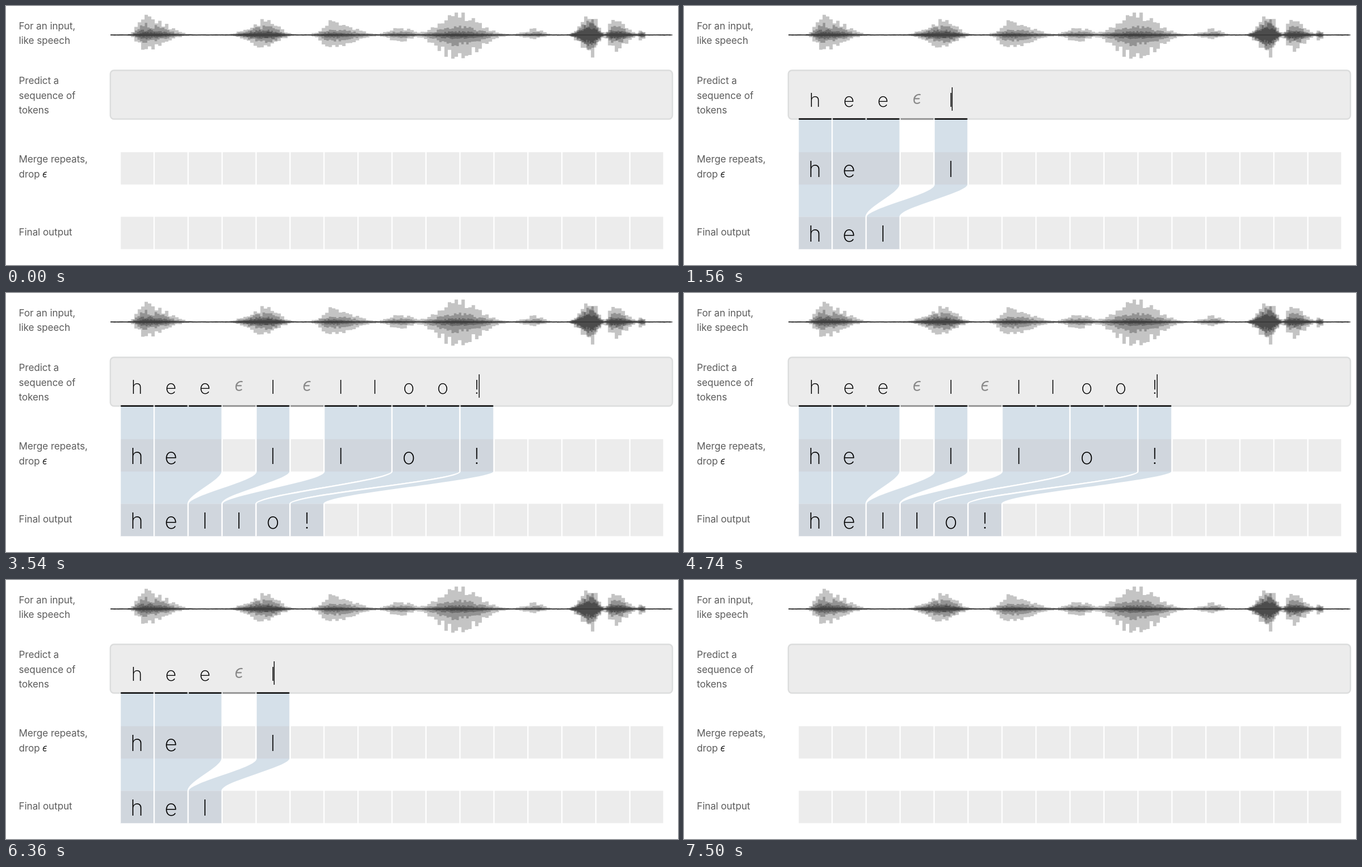
Animation of 1203 by 465 pixels, one loop 8 s. Source, as an HTML page:

```html
<!DOCTYPE html>
<html lang="en">
<head>
<meta charset="utf-8">
<style>
html, body { margin: 0; width: 100%; height: 100%; overflow: hidden; background: #fff; }
svg { display: block; }
text { font-family: Inter, "Open Sans", sans-serif; }
.label { font-size: 17.3px; fill: #5c5c5c; letter-spacing: -.05px; }
.token, .letter { font-weight: 200; text-anchor: middle; }
.token { font-size: 34.5px; }
.letter { font-size: 39.5px; }
.eps { fill: none; stroke-width: 2.3; stroke-linecap: round; }
.side { fill: none; stroke: #fff; }
</style>
</head>
<body>
<svg width="1203" height="465" viewBox="0 0 1203 465">
  <g id="wave"></g>
  <g id="labels"></g>
  <rect x="186.8" y="115.6" width="1006.2" height="87.4" rx="6.5" fill="#ececec" stroke="#dcdddd" stroke-width="2.5"/>
  <g id="cells"></g>
  <g id="typed"></g>
</svg>
<script>
const LOOP = 8000, STEP = 800 / 3, TYPE_AT = 480, ERASE_AT = 4809;
const TOKENS = "heeϵlϵlloo!";
const LEFT = 205.5, PITCH = 60.83, CELL = 58.5, GAP = PITCH - CELL;
const TOP = 204.1, MERGED_Y = 262.5, OUTPUT_Y = 378.5, CELL_H = 58;
const $ = id => document.getElementById(id);
const cellX = i => LEFT + PITCH * i;
const centre = i => cellX(i) + CELL / 2 - .3;
const rect = (x, y, w, h, fill) =>
  `<rect x="${x}" y="${y}" width="${w}" height="${h}" fill="${fill}"/>`;
const text = (x, y, cls, s) => `<text x="${x}" y="${y}" class="${cls}">${s}</text>`;

// Lunate epsilon: open bowl with a middle bar, centred on x, y
const epsilon = (x, y, scale, colour) =>
  `<path class="eps" transform="translate(${x} ${y}) scale(${scale})" stroke="${colour}" ` +
  `d="M5.4-7.9C-1-9-5.4-4-5.4 1.5C-5.4 6-3 7.9 0 7.9C2 7.9 3.3 7.3 4.4 6.4M-4.6-.6H3.6"/>`;

// Speech bursts: centre, rise and fall widths, height above and below, density
const BURSTS = [
  [249, 17, 45, 42, 30, .5], [465, 40, 30, 28, 24, .6], [584, 24, 50, 26, 27, .45],
  [706, 28, 30, 15, 13, .45], [810, 46, 50, 41, 48, .42], [950, 30, 18, 12, 8, .45],
  [1048, 23, 14, 45, 43, .72], [1088, 11, 28, 32, 30, .58], [1138, 6, 6, 12, 12, .6]
];

let seed = 11;
const random = () => (seed = seed * 16807 % 2147483647) / 2147483647;

// Each deeper layer is finer, lower and darker
function waveLayer(depth) {
  const pitch = 6.1 * .72 ** depth;
  let d = "";
  for (let x = 187; x < 1190; x += pitch) {
    let up = 1.2, down = 1.2;
    for (const [mid, rise, fall, high, low, density] of BURSTS) {
      const off = x + pitch / 2 - mid;
      const size = Math.exp(-((off / (off < 0 ? rise : fall)) ** 2)) * density ** depth;
      up = Math.max(up, high * size);
      down = Math.max(down, low * size);
    }
    const jitter = () => .6 + .45 * random();
    const y = 52 - up * jitter();
    d += `M${x} ${y}h${pitch}V${52 + down * jitter()}h${-pitch}z`;
  }
  return `<path d="${d}" fill-opacity="${.23 + .02 * depth}"/>`;
}

$("wave").innerHTML = [0, 1, 2, 3].map(waveLayer).join("") +
  rect(187, 51.4, 1003, 1.2, "rgba(0,0,0,.4)");

const LABELS = [
  [41.5, "For an input,", "like speech"],
  [140, "Predict a", "sequence of", "tokens"],
  [281, "Merge repeats,", "drop"],
  [412, "Final output"]
];
$("labels").innerHTML = LABELS.map(([y, ...lines]) =>
  lines.map((s, i) => text(23, y + 26.5 * i, "label", s)).join("")).join("") +
  epsilon(69.5, 302.8, .55, "#111");

$("cells").innerHTML = Array.from({ length: 16 }, (_, i) =>
  [MERGED_Y, OUTPUT_Y].map(y => rect(cellX(i), y, CELL, CELL_H, "#ececec")).join("")).join("");

function mergeRepeats(tokens) {
  const groups = [];
  [...tokens].forEach((c, i) => {
    if (c === "ϵ") return;
    if (tokens[i - 1] === c) groups[groups.length - 1].last = i;
    else groups.push({ c, first: i, last: i });
  });
  return groups;
}

// A band flows from its token cells to one output cell, with white edges
function drawGroup({ c, first, last }, slot) {
  const edge = i => cellX(i) - GAP / 2;
  const l = edge(first), r = edge(last + 1), L = edge(slot), R = edge(slot + 1);
  const y = MERGED_Y + CELL_H, bend = (OUTPUT_Y - y) * .28;
  const end = OUTPUT_Y + CELL_H, blue = "#d5e0e9", dark = "#d0d6dd";
  const down = (a, b) => `${a} ${TOP}V${y}C${a} ${y + bend} ${b} ${OUTPUT_Y - bend} ${b} ${OUTPUT_Y}`;
  const up = `C${R} ${OUTPUT_Y - bend} ${r} ${y + bend} ${r} ${y}V${TOP}z`;
  return `<path fill="${blue}" d="M${down(l, L)}H${R}${up}"/>` +
    rect(l, MERGED_Y, r - l, CELL_H, dark) + rect(L, OUTPUT_Y, R - L, CELL_H, dark) +
    `<path class="side" stroke-width="${GAP}" d="M${down(l, L)}V${end}M${down(r, R)}V${end}"/>` +
    text(centre(first), 306.8, "letter", c) + text(centre(slot), 422.8, "letter", c);
}

function drawToken(c, i) {
  const blank = c === "ϵ";
  return rect(cellX(i), 201.6, CELL, 2.5, blank ? "#888" : "#000") +
    (blank ? epsilon(centre(i) + .3, 167, 1, "#888") : text(centre(i), 181, "token", c));
}

function draw(count) {
  const tokens = TOKENS.slice(0, count);
  let out = mergeRepeats(tokens).map(drawGroup).join("") + [...tokens].map(drawToken).join("");
  if (count) {
    const reach = { l: 1.6, "!": 3.6, "ϵ": 8 }[tokens[count - 1]] || 8;
    out += rect(centre(count - 1) + reach, 146, 1.4, 42, "#000");
  }
  $("typed").innerHTML = out;
}

const stepsSince = (t, start) =>
  Math.max(0, Math.min(TOKENS.length, Math.floor((t - start) / STEP) + 1));

let shown = -1;
function tick() {
  const t = performance.now() % LOOP;
  const count = stepsSince(t, TYPE_AT) - stepsSince(t, ERASE_AT);
  if (count !== shown) draw(shown = count);
  requestAnimationFrame(tick);
}
tick();
</script>
</body>
</html>
```
